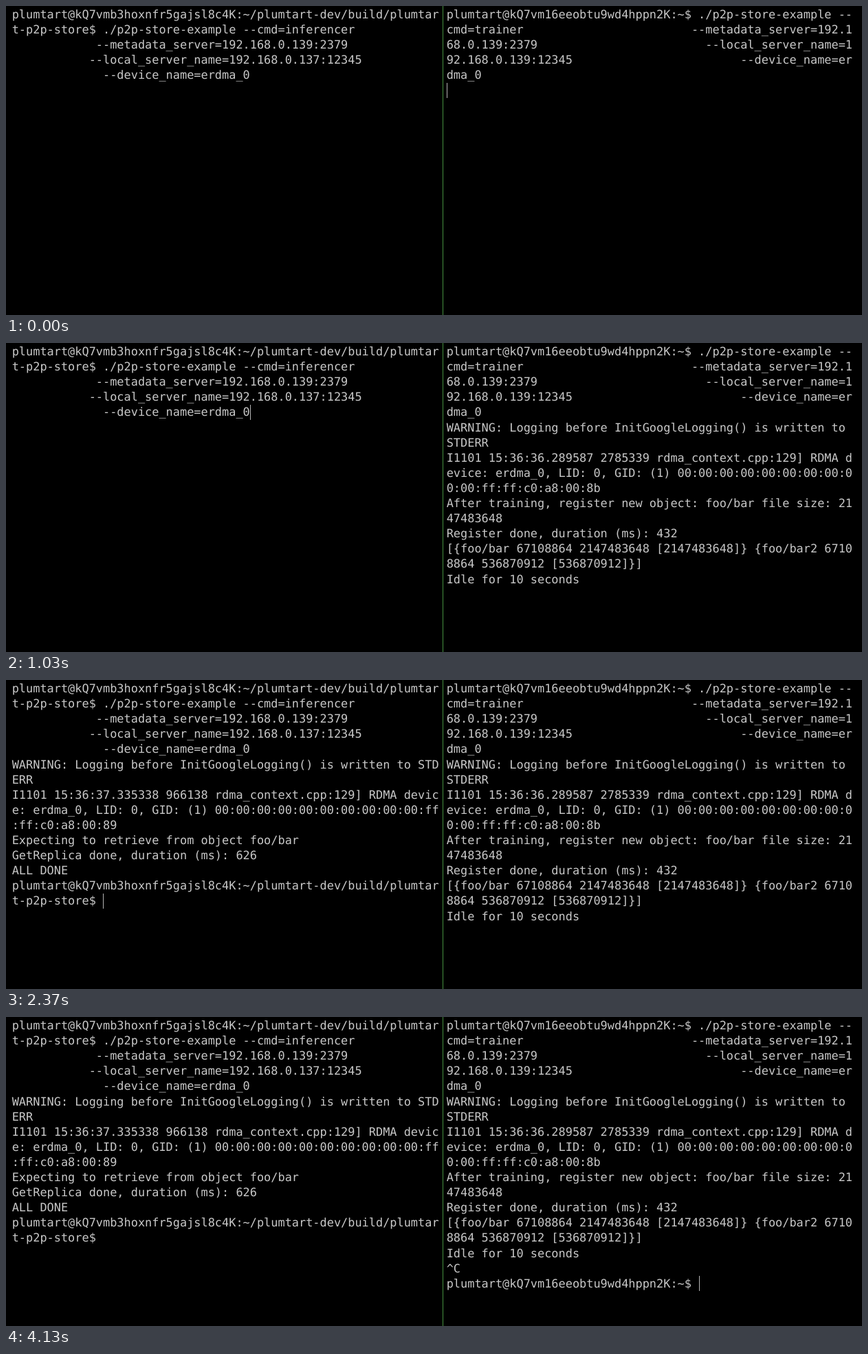
Animation, 1245 px wide and 450 px high, one loop 4460 ms. Source, as an HTML page:

```html
<!DOCTYPE html>
<html lang="en">
<head>
<meta charset="utf-8">
<title>Split terminal</title>
<style>
  html, body { margin: 0; width: 100%; height: 100%; overflow: hidden; background: #000; }
  body { position: relative; }
  pre {
    position: absolute;
    left: var(--x);
    top: calc(1.1px + var(--row, 0) * 22.1px);
    margin: 0;
    color: #c8c8c8;
    font: 16.92px/22.1px "DejaVu Sans Mono", monospace;
    font-variant-ligatures: none;
    text-rendering: geometricPrecision;
  }
  .left { --x: 8.7px; }
  .right { --x: 640.7px; }
  #divider { position: absolute; left: 635px; top: 0; width: 1px; height: 100%; background: #459140; }
  #caret { position: absolute; left: 0; top: 0; width: 1px; height: 22px; background: #b4b4b4; }
  #pointer { position: absolute; left: 0; top: 0; width: 16px; height: 24px; overflow: visible; }
</style>
</head>
<body>
<div class="left">
<pre>plumtart@kQ7vmb3hoxnfr5gajsl8c4K:~/plumtart-dev/build/plumtar
t-p2p-store$ ./p2p-store-example --cmd=inferencer
            --metadata_server=192.168.0.139:2379
           --local_server_name=192.168.0.137:12345
             --device_name=erdma_0</pre>
<pre style="--row:5" data-at="1100">WARNING: Logging before InitGoogleLogging() is written to STD
ERR
I1101 15:36:37.335338 966138 rdma_context.cpp:129] RDMA devic
e: erdma_0, LID: 0, GID: (1) 00:00:00:00:00:00:00:00:00:00:ff
:ff:c0:a8:00:89</pre>
<pre style="--row:10" data-at="1130">Expecting to retrieve from object foo/bar</pre>
<pre style="--row:11" data-at="1730">GetReplica done, duration (ms): 626</pre>
<pre style="--row:12" data-at="2100">ALL DONE</pre>
<pre style="--row:13" data-at="2370">plumtart@kQ7vmb3hoxnfr5gajsl8c4K:~/plumtart-dev/build/plumtar
t-p2p-store$</pre>
</div>
<div id="divider"></div>
<div class="right">
<pre>plumtart@kQ7vm16eeobtu9wd4hppn2K:~$ ./p2p-store-example --
cmd=trainer                        --metadata_server=192.1
68.0.139:2379                        --local_server_name=1
92.168.0.139:12345                        --device_name=er
dma_0</pre>
<pre style="--row:5" data-at="30">WARNING: Logging before InitGoogleLogging() is written to
STDERR
I1101 15:36:36.289587 2785339 rdma_context.cpp:129] RDMA d
evice: erdma_0, LID: 0, GID: (1) 00:00:00:00:00:00:00:00:0
0:00:ff:ff:c0:a8:00:8b</pre>
<pre style="--row:10" data-at="70">After training, register new object: foo/bar file size: 21
47483648</pre>
<pre style="--row:12" data-at="470">Register done, duration (ms): 432
[{foo/bar 67108864 2147483648 [2147483648]} {foo/bar2 6710
8864 536870912 [536870912]}]
Idle for 10 seconds</pre>
<pre style="--row:16" data-at="4030">^C</pre>
<pre style="--row:17" data-at="4130">plumtart@kQ7vm16eeobtu9wd4hppn2K:~$</pre>
</div>
<div id="caret"></div>
<svg id="pointer" viewBox="0 0 16 24">
  <path d="M.5 .5V18L4.4 14.4 7.3 21.2 10.2 20 7.4 13.4H12.8Z" fill="#fff" stroke="#000" stroke-width="1.2" paint-order="stroke"/>
</svg>
<script>
  const LOOP = 4460;
  const LEFT = 8.7, RIGHT = 640.7;
  const COL = 10.19, ROW = 22.1;

  const move = (x, y) => ({ transform: `translate(${x}px, ${y}px)` });

  // Each step is [ms, properties, easing towards the next step].
  function play(el, steps) {
    const frames = steps.map(([ms, props, easing = "step-end"]) =>
      ({ offset: ms / LOOP, easing, ...props }));
    el.animate(frames, { duration: LOOP, iterations: Infinity });
  }

  for (const el of document.querySelectorAll("[data-at]")) {
    play(el, [[0, { opacity: 0 }], [+el.dataset.at, { opacity: 1 }], [LOOP, { opacity: 1 }]]);
  }

  const cell = (ms, pane, row, col = 0) =>
    [ms, move(Math.round(pane + col * COL), Math.round(1.1 + row * ROW))];

  play(document.getElementById("caret"), [
    cell(0, RIGHT, 5),
    cell(30, RIGHT, 10),
    cell(70, RIGHT, 12),
    cell(470, LEFT, 4, 34),
    cell(1070, LEFT, 5),
    cell(1100, LEFT, 10),
    cell(1130, LEFT, 11),
    cell(1730, LEFT, 12),
    cell(2100, LEFT, 13),
    cell(2370, LEFT, 14, 13),
    cell(3300, RIGHT, 16),
    cell(4030, RIGHT, 16, 2),
    cell(4130, RIGHT, 17, 36),
    cell(LOOP, RIGHT, 17, 36)
  ]);

  const at = (ms, x, y, easing) => [ms, { ...move(x, y), opacity: 1 }, easing];
  const hide = ms => [ms, { ...move(0, 0), opacity: 0 }];

  play(document.getElementById("pointer"), [
    hide(0),
    at(30, 55, 7, "steps(5)"),
    at(200, 330, 136, "steps(5)"),
    at(370, 439, 186),
    hide(1030),
    at(2930, 448, 186, "steps(4)"),
    at(3070, 975, 260),
    at(3630, 930, 224, "steps(2)"),
    at(3700, 773, 97),
    hide(3730),
    hide(LOOP)
  ]);
</script>
</body>
</html>
```
